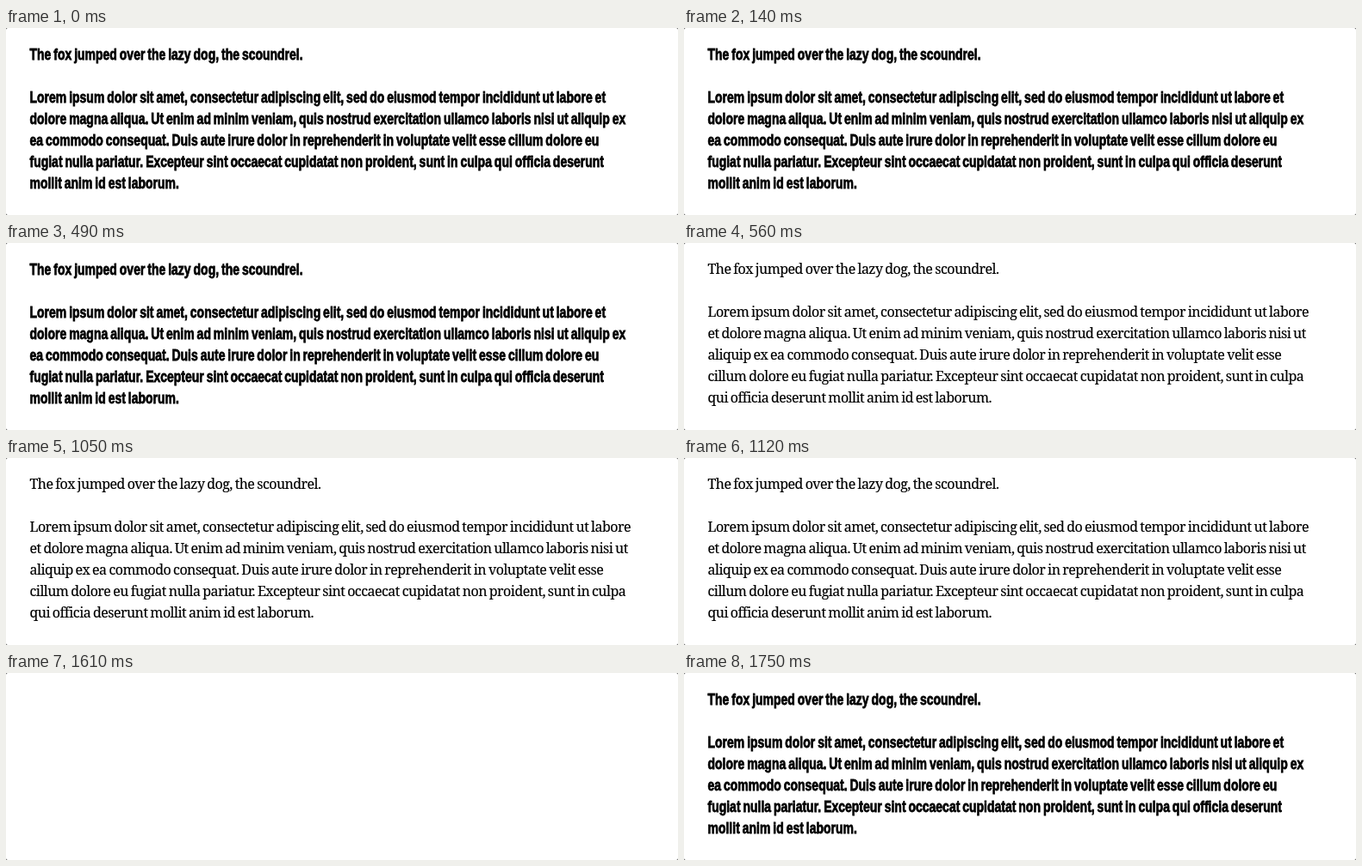
Write an HTML page that moves like this. It is 780x218 px and loops after 1820 ms.

```html
<!DOCTYPE html>
<html lang="en">
<head>
<meta charset="utf-8">
<title>Font swap</title>
<style>
  html, body { margin: 0; width: 100%; height: 100%; overflow: hidden; background: #333; }
  svg { display: block; width: 780px; height: 218px; }
  text { white-space: pre; }
  #heavy {
    font: bold 17.5px "Liberation Sans", Arial, sans-serif;
    word-spacing: -1.2px;
    stroke: #000;
    stroke-width: .75px;
  }
  #serif {
    font: 16px "Noto Serif", serif;
    letter-spacing: -.54px;
    word-spacing: -.8px;
    stroke: #000;
    stroke-width: .15px;
  }
</style>
</head>
<body>
<svg viewBox="0 0 780 218">
  <rect width="780" height="218" rx="2" fill="#fff"/>
  <g id="heavy" transform="translate(27.5 37) scale(.8 1)"></g>
  <g id="serif" transform="translate(27.5 36)"></g>
</svg>
<script>
const LOOP = 1820, LEADING = 25;
const title = "The fox jumped over the lazy dog, the scoundrel.";
const heavy = document.getElementById("heavy");
const serif = document.getElementById("serif");

function setLines(group, lines) {
  [title, "", ...lines].forEach((line, i) => {
    const text = document.createElementNS(group.namespaceURI, "text");
    text.setAttribute("y", i * LEADING);
    text.textContent = line;
    group.append(text);
  });
}

setLines(heavy, [
  "Lorem ipsum dolor sit amet, consectetur adipiscing elit, sed do eiusmod tempor incididunt ut labore et",
  "dolore magna aliqua. Ut enim ad minim veniam, quis nostrud exercitation ullamco laboris nisi ut aliquip ex",
  "ea commodo consequat. Duis aute irure dolor in reprehenderit in voluptate velit esse cillum dolore eu",
  "fugiat nulla pariatur. Excepteur sint occaecat cupidatat non proident, sunt in culpa qui officia deserunt",
  "mollit anim id est laborum."
]);
setLines(serif, [
  "Lorem ipsum dolor sit amet, consectetur adipiscing elit, sed do eiusmod tempor incididunt ut labore",
  "et dolore magna aliqua. Ut enim ad minim veniam, quis nostrud exercitation ullamco laboris nisi ut",
  "aliquip ex ea commodo consequat. Duis aute irure dolor in reprehenderit in voluptate velit esse",
  "cillum dolore eu fugiat nulla pariatur. Excepteur sint occaecat cupidatat non proident, sunt in culpa",
  "qui officia deserunt mollit anim id est laborum."
]);

const show = (group, on) => group.style.display = on ? "" : "none";

// Heavy face, then serif, then a short blank before the heavy face returns.
function draw(t) {
  show(heavy, t < 560 || t >= 1750);
  show(serif, t >= 560 && t < 1610);
}

const start = performance.now();
function tick() {
  draw((performance.now() - start) % LOOP);
  requestAnimationFrame(tick);
}
draw(0);
requestAnimationFrame(tick);
</script>
</body>
</html>
```
